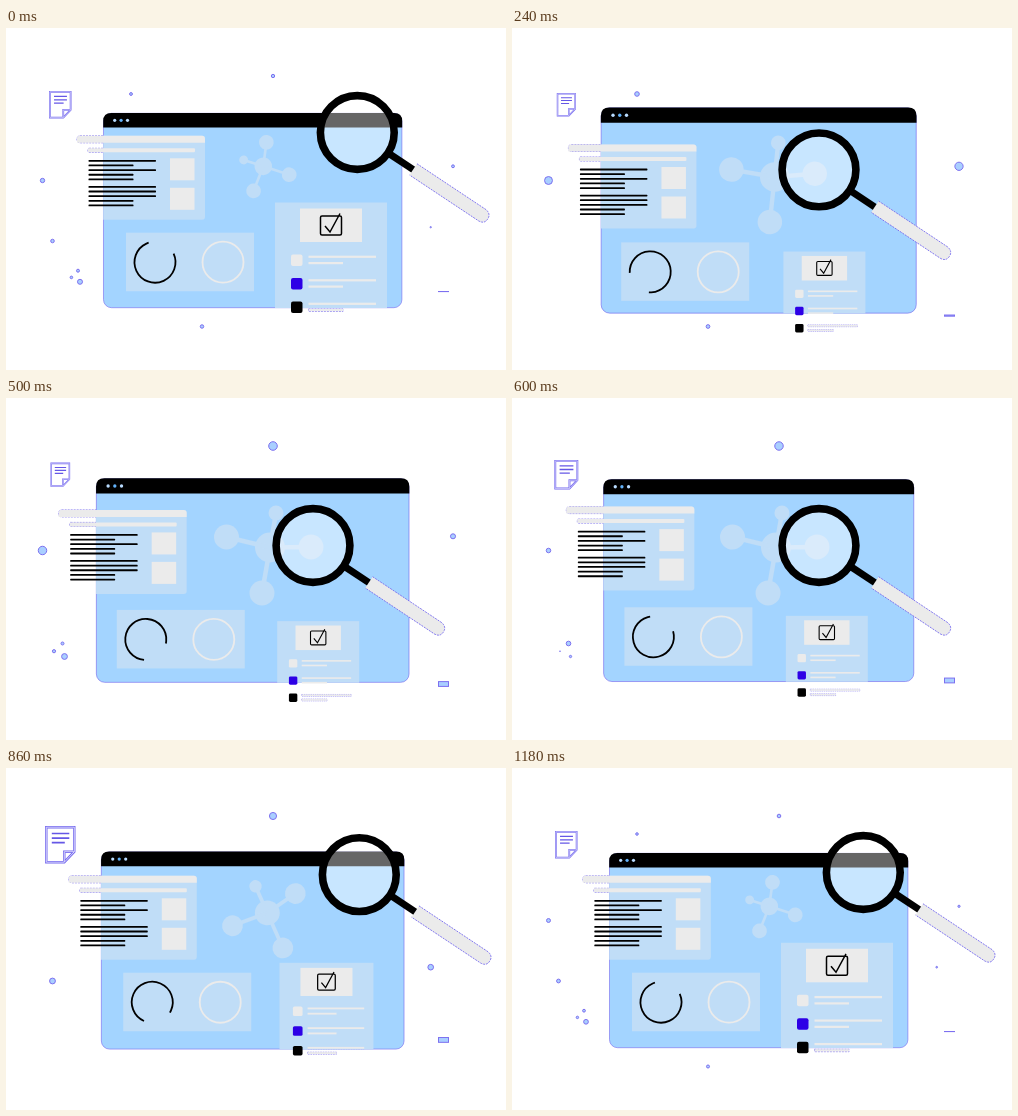
These frames come from a looping animation (500 by 342 pixels, 1200 ms). An HTML page:

```html
<!DOCTYPE html>
<html lang="en">
<head>
<meta charset="utf-8">
<title>Search illustration</title>
<style>
  html, body { margin: 0; width: 100%; height: 100%; overflow: hidden; background: #fff; }
  svg { display: block; width: 100vw; height: 100vh; }
  .soft { fill: #c0ddf7; }
  .light { fill: #ebebeb; }
  .edge { fill: none; stroke: #7468ee; stroke-width: .8; stroke-dasharray: 2 1; }
  .dot { fill: #a9cfff; stroke: #7d70f0; stroke-width: 1; }
</style>
</head>
<body>
<svg viewBox="0 0 500 342">
  <defs>
    <clipPath id="clip"><rect id="clipRect" x="-149.5" y="-97.5" width="299" height="195" rx="8"/></clipPath>
  </defs>

  <g id="dots"></g>
  <rect id="chip" class="dot" x="432.5" width="10"/>

  <g id="note" fill="none">
    <path d="M-14-17.5H14V7L4 17.5H-14ZM14 7H4V17.5" stroke="#7468ee" stroke-width="2.4"/>
    <path d="M-14-17.5H14V7L4 17.5H-14ZM14 7H4V17.5" stroke="#ebebff" stroke-width=".8"/>
    <path d="M-8.5-11.2H9M-8.5-6.6H9M-8.5-2H4.5" stroke="#6557e6" stroke-width="1.7"/>
  </g>

  <!-- thin outlines that show only outside the window -->
  <g id="listEdge" class="edge">
    <rect width="128" height="7" rx="3"/>
    <rect x="11" y="12.5" width="107" height="4" rx="1"/>
  </g>
  <g id="formEdge" class="edge">
    <rect x="33.5" y="100.2" width="67.5" height="2.4"/>
    <rect x="33.5" y="106.5" width="34.5" height="2.4"/>
  </g>

  <g id="win">
    <rect x="-149.2" y="-97.2" width="298.4" height="194.4" rx="8" fill="#a3d4ff" stroke="#7468ee" stroke-width=".6"/>
    <path d="M-149.5-83V-89.5Q-149.5-97.5-141.5-97.5H141.5Q149.5-97.5 149.5-89.5V-83Z"/>
    <circle cx="-138" cy="-90.2" r="1.6" fill="#b9dcff"/>
    <circle cx="-131.6" cy="-90.2" r="1.6" fill="#62b2fa"/>
    <circle cx="-125.2" cy="-90.2" r="1.6" fill="#b9dcff"/>
  </g>

  <g id="mol" class="soft"></g>

  <g clip-path="url(#clip)">
    <rect id="listBack" class="soft" width="128" height="84" rx="3"/>
    <rect id="formBack" class="soft" width="112" height="130"/>
  </g>

  <g id="list"></g>

  <g id="rings">
    <rect class="soft" width="128" height="58.5"/>
    <circle cx="97" cy="29.5" r="20.5" fill="none" stroke="#ebebeb" stroke-width="1.8"/>
    <circle id="arc" cx="29" cy="29.5" r="20.5" fill="none" stroke="#000" stroke-width="1.8"
      pathLength="360" stroke-dasharray="277 83"/>
  </g>

  <g id="form"></g>

  <g id="lens">
    <circle r="34" fill="#fff" fill-opacity=".4"/>
    <g transform="rotate(33.6)">
      <rect x="37" y="-3.5" width="32" height="7"/>
      <path d="M67-7H150Q156.5-6 156.5 0T150 6.5H67Z" class="light"/>
      <path d="M67-7H150Q156.5-6 156.5 0T150 6.5H67" class="edge"/>
    </g>
    <circle r="36.9" fill="none" stroke="#000" stroke-width="7.6"/>
  </g>
</svg>
<script>
const LOOP = 1200;
const el = id => document.getElementById(id);

function add(parent, tag, attrs) {
  const node = document.createElementNS('http://www.w3.org/2000/svg', tag);
  for (const k in attrs) node.setAttribute(k, attrs[k]);
  return parent.appendChild(node);
}
const rect = (parent, x, y, width, height, fill, rx = 0) =>
  add(parent, 'rect', { x, y, width, height, fill, rx });
const place = (value, ...ids) => ids.forEach(id => el(id).setAttribute('transform', value));

const part = (t, a, b) => Math.min(1, Math.max(0, (t - a) / (b - a)));
const inOut = u => (1 - Math.cos(Math.PI * u)) / 2;
const out = u => 1 - (1 - u) ** 1.65;
const mix = (a, b, k) => a + (b - a) * k;
// Rises from 0 to 1 over a..b, rests, and returns to 0 over c..d.
const swing = (t, a, b, c, d) => inOut(part(t, a, b)) - inOut(part(t, c, d));

// A dot swells up to its peak time and then fades away, once per loop.
const dots = [];
function dot(cx, cy, r, peak, rise = 480, fall = 240) {
  const node = add(el('dots'), 'circle', { cx, cy, class: 'dot' });
  dots.push(t => {
    const age = (t - peak + rise + 2 * LOOP) % LOOP - rise;
    const u = age < 0 ? -age / rise : age / fall;
    const size = u < 1 ? r * Math.cos(u * Math.PI / 2) : 0;
    node.setAttribute('r', Math.max(0, size - .5));
    node.setAttribute('visibility', size > .6 ? 'visible' : 'hidden');
  });
}

function buildDots() {
  dot(36.5, 152.5, 5, 450, 700);
  dot(447, 138.3, 5, 360);
  dot(125, 66, 2.8, 250);
  dot(196, 298.5, 3, 140, 300);
  dot(267, 48, 4.8, 500, 80, 1000);
  dot(46.5, 213, 3.4, 860, 80, 640);
  dot(424.7, 199.2, 3.6, 700, 100, 635);
  dot(58.5, 258.5, 3.8, 430, 180);
  dot(56.5, 245.5, 2.8, 600, 200);
  dot(48, 253.2, 2.1, 500, 80, 140);
  dot(74, 253.8, 3, 0, 100, 130);
  dot(72, 242.7, 2, 0, 100, 130);
  dot(65.4, 249.4, 1.8, 0, 100, 130);
}

function buildList(g) {
  add(g, 'path', { d: 'M0 7V3Q0 0 3 0H125Q128 0 128 3V7Z', fill: '#ebebeb' });
  rect(g, 11, 12.5, 107, 4, '#ebebeb', 1);
  rect(g, 93, 22.5, 24.5, 22, '#ebebeb');
  rect(g, 93, 52, 24.5, 22, '#ebebeb');
  [...'LSLSSLLLSS'].forEach((size, i) => {
    const y = 25 + i * 4.65 + (i > 4 ? 2.8 : 0);
    rect(g, 11.5, y - .9, size === 'L' ? 67.5 : 45, 1.8, '#000', .6);
  });
}

function buildForm(g) {
  rect(g, 25, 6, 62, 33.5, '#ebebeb');
  add(g, 'path', {
    d: 'M47 13.5H65Q66.5 13.5 66.5 15V31Q66.5 32.5 65 32.5H47Q45.5 32.5 45.5 31V15Q45.5 13.5 47 13.5ZM50 23.5L55 29.5L65 11',
    fill: 'none', stroke: '#000', 'stroke-width': 1.5
  });
  ['#ebebeb', '#2d00e6', '#000'].forEach((color, i) => {
    const y = 52 + i * 23.5;
    rect(g, 16, y, 11.5, 11.5, color, 2);
    rect(g, 33.5, y + 1.2, 67.5, 2.2, '#ebebeb');
    rect(g, 33.5, y + 7.5, 34.5, 2.2, '#ebebeb');
  });
}

function buildMolecule(g) {
  const nodes = [[6, -34.5, 7.5], [-43.5, -10.5, 12.5], [-8, 45.5, 12.5], [41, -.5, 12.5]];
  add(g, 'circle', { r: 15 });
  for (const [cx, cy, r] of nodes) {
    add(g, 'line', { x2: cx, y2: cy, stroke: '#c0ddf7', 'stroke-width': 4.5 });
    add(g, 'circle', { cx, cy, r });
  }
}

buildDots();
buildList(el('list'));
buildForm(el('form'));
buildMolecule(el('mol'));

function draw(t) {
  const s = (...times) => swing(t, ...times);

  const swell = s(0, 265, 265, 1160);
  place(`translate(246.7 182.5) scale(${mix(1, 1.057, swell)})`, 'win', 'clipRect');

  const listX = mix(71, 52.3, s(0, 350, 430, 1230));
  const listY = mix(107.8, 116.5, s(0, 220, 320, 670));
  place(`translate(${listX} ${listY})`, 'list', 'listBack', 'listEdge');

  const ringY = mix(204.7, 215, s(40, 280, 280, 880));
  place(`translate(${mix(120, 109, swell)} ${ringY})`, 'rings');
  const spin = 240 * out(part(t, 0, 500)) + 480 * out(part(t, 500, 1180));
  place(`rotate(${-24 - spin} 29 29.5)`, 'arc');

  const formX = 269 + 4 * s(0, 150, 150, 360) + 6 * s(360, 700, 700, 1180);
  const formY = mix(174.5, 225, s(0, 270, 400, 1220));
  const formS = mix(1, .732, s(0, 220, 700, 1070));
  place(`translate(${formX} ${formY}) scale(${formS})`, 'form', 'formBack', 'formEdge');

  const turn = s(0, 280, 590, 1200);
  const molX = mix(257.3, 264, s(100, 300, 600, 1200));
  const molY = mix(138.3, 149.5, turn);
  place(`translate(${molX} ${molY}) rotate(${mix(-82, 0, turn)}) scale(${mix(.59, 1, turn)})`, 'mol');

  const settle = 2 * s(700, 860, 860, 1180);
  const lensX = mix(351.3, 307, s(0, 220, 600, 860)) + settle;
  const lensY = mix(104.5, 147.5, s(50, 300, 620, 870)) + settle;
  place(`translate(${lensX} ${lensY})`, 'lens');

  const noteW = 22.5 - 4.5 * s(0, 360, 400, 640) + 8 * s(480, 860, 860, 1180);
  place(`translate(54.3 76.7) scale(${noteW / 30.5})`, 'note');

  el('chip').setAttribute('y', mix(263.5, 287.5, swell));
  el('chip').setAttribute('height', .1 + 4.7 * s(140, 460, 860, 1180));

  dots.forEach(update => update(t));
}

const start = performance.now();
function tick() {
  draw((performance.now() - start) % LOOP);
  requestAnimationFrame(tick);
}
draw(0);
requestAnimationFrame(tick);
</script>
</body>
</html>
```
